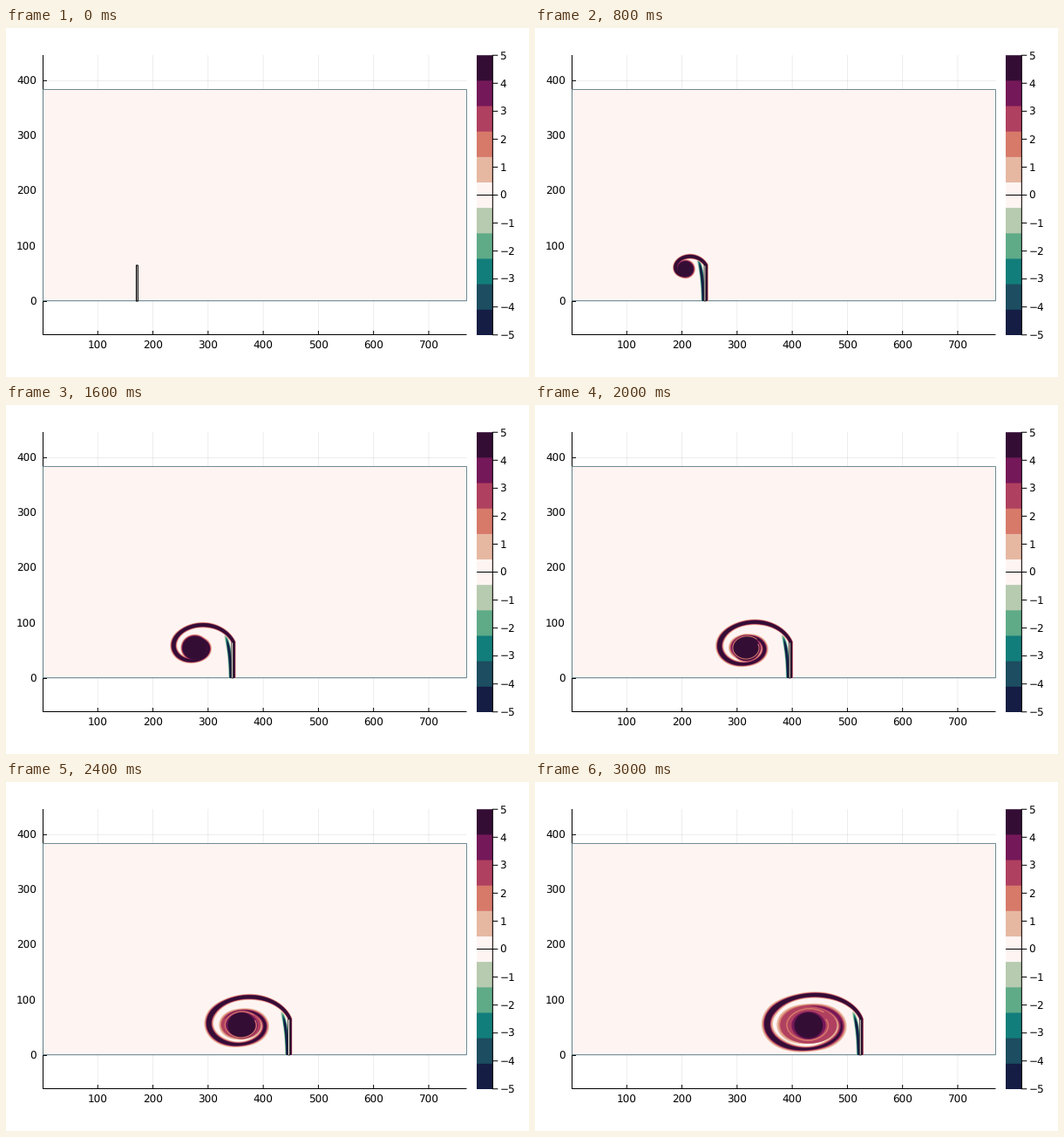
Animation, 600 px wide and 400 px high, one loop 3050 ms. Source, as a matplotlib script:

```python
import numpy as np
import matplotlib.pyplot as plt
from matplotlib.animation import FuncAnimation

FRAMES, STEP = 61, 50
SCALE = 0.6328            # pixels per data unit
WARM = ["#e6b8a2", "#d77a6a", "#b04060", "#751859", "#340d35"]
COOL = ["#b7cbb0", "#5fab88", "#127e7b", "#1c4d60", "#151d44"]
PALE = "#fef5f3"
LEVELS = (np.arange(5) + 0.5) * 10 / 11
TIP_Y, FLOOR = 272, 313

plt.rcParams["text.hinting"] = "no_hinting"
fig = plt.figure(figsize=(6, 4), dpi=100, facecolor="white")
ax = fig.add_axes([0, 0, 1, 1])
ax.set_xlim(0, 600)
ax.set_ylim(400, 0)
ax.axis("off")


def line(xs, ys, color="black", width=1.0, z=2, **kw):
    return ax.plot(xs, ys, color=color, lw=width * 0.72, zorder=z,
                   solid_capstyle="butt", snap=False, **kw)[0]


def label(x, y, value, ha):
    ax.text(x, y, str(value).replace("-", "\u2212"), ha=ha, va="baseline",
            family="DejaVu Sans", size=8.64)


def box(x0, y0, x1, y1, **kw):
    return ax.fill([x0, x1, x1, x0], [y0, y0, y1, y1], snap=False, **kw)[0]


def draw_chart():
    for v in range(100, 800, 100):
        x = 42 + SCALE * v
        line([x, x], [31, 352], width=0.7, z=1, alpha=0.1)
        line([x, x], [347, 352])
        label(x, 367.4, v, "center")
    for v in range(0, 500, 100):
        y = 313.5 - SCALE * v
        line([42, 528.5], [y, y], width=0.7, z=1, alpha=0.1)
        line([42, 47], [y, y])
        label(35, y + 4.3, v, "right")
    line([42.5, 42.5], [31, 352])
    line([42, 528.5], [351.5, 351.5])
    box(42.5, 70.5, 528.5, 312.6, fc=PALE, ec="#62808a", lw=0.65, zorder=3)

    h = 320.8 / 11
    for i, c in enumerate(WARM[::-1] + [PALE] + COOL):
        box(540, 31.2 + i * h, 558.3, 352, fc=c, lw=0, zorder=2)
    line([558.3, 558.3], [31, 352], z=4)
    for v in range(-5, 6):
        y = 191.5 - 32.05 * v
        line([540 if v == 0 else 558, 564.3], [y, y], z=4)
        label(566.3, y + 4.3, v, "left")


def layers(colors, z):
    return [ax.fill([0, 0, 0], [0, 0, 0], fc=c, lw=0, zorder=z + i * 0.1)[0]
            for i, c in enumerate(colors)]


draw_chart()
back = layers(COOL, 5)
arm = layers(WARM, 6)
core = layers(WARM, 6.05)
streak = line([], [], WARM[1], 1, 7)
plate = box(0, 0, 1, 1, fc=PALE, ec="black", zorder=8, joinstyle="round")
flow = back + arm + core + [streak]


def travel(t):
    """Plate path: constant acceleration, then constant speed."""
    s = t / 500
    return s * s / 2 if s < 1 else s - 0.5


def grow(s, limit, rate):
    return limit * (1 - np.exp(-s / rate))


def band(x, y, peak, sigma, level):
    """Outline of a Gaussian ribbon cut at one level."""
    half = sigma * np.sqrt(2 * np.log(np.maximum(peak / level, 1)))
    dx, dy = np.gradient(x), np.gradient(y)
    n = np.hypot(dx, dy) + 1e-9
    ox, oy = -dy / n * half, dx / n * half
    return np.column_stack([np.r_[x + ox, (x - ox)[::-1]],
                            np.r_[y + oy, (y - oy)[::-1]]])


def polar(cx, cy, r, deg):
    a = np.radians(deg)
    return cx + r * np.cos(a), cy - r * np.sin(a)


def ellipse(deg, aspect):
    """Polar radius of an ellipse of unit width and the given height."""
    a = np.radians(deg)
    return aspect / np.hypot(aspect * np.cos(a), np.sin(a))


def draw(frame):
    t = frame * STEP
    q = t / 3000
    s = travel(t)
    px = 150.4 + 64 * SCALE * s
    w = 0.9
    plate.set_xy([(px - w, FLOOR), (px - w, TIP_Y), (px + w, TIP_Y),
                  (px + w, FLOOR)])
    plate.set_linewidth(0.5 if frame else 0.8)
    for a in flow:
        a.set_visible(frame > 0)
    if frame == 0:
        return flow + [plate]

    ox, oy = grow(s, 69, 2.6), grow(s, 7, 1.2)
    rad = grow(s, 15, 1.2)
    thin = 0.4 + 0.6 * min(1, ox / 23)
    tip_x = px + 1.4
    cx, cy = tip_x - ox, TIP_Y + oy

    # Counter-rotating layer behind the plate
    u = np.linspace(0, 1, 50)
    top = TIP_Y - 9 * min(1, ox / 23)
    by = top + (FLOOR - top) * u
    bx = px - (1.3 + 4.4 * np.exp((TIP_Y - by) / 18)) * thin
    for p, lv in zip(back, LEVELS):
        p.set_xy(band(bx, by, 8 * np.minimum(1, 0.04 + 3 * u), 1.05 * thin, lv))

    # Elliptic spiral from the tip, winding in towards a limiting radius
    start = np.degrees(np.arctan2(oy, ox))
    aspect = 0.92 - 0.28 * q
    inner, decay = 20 * q, 0.26 + 0.39 * q * q
    outer = np.hypot(ox, oy) / ellipse(start, aspect)

    def width(deg):
        return inner + (outer - inner) * decay ** ((deg - start) / 180)

    def spiral(deg):
        return width(deg) * ellipse(deg, aspect)

    # Front layer, running up the plate and into the spiral
    deg = np.linspace(start, 720, 420)
    sx, sy = polar(cx, cy, spiral(deg), deg)
    wy = np.linspace(FLOOR, TIP_Y + 1, 25)
    x, y = np.r_[np.full(25, tip_x), sx], np.r_[wy, sy]
    ang = np.r_[np.zeros(25), deg]
    peak = 14 * np.exp(-1.2 * q ** 0.7 * ang / 360)
    swell = np.clip((ang - 95) / 60, 0, 1) * np.cos(np.radians(ang)) ** 2
    lift = np.clip(ang / 60, 0, 1)
    sigma = (0.95 + (0.15 + 0.35 * q) * lift + 1.3 * q * q * swell) * thin
    for p, lv in zip(arm, LEVELS):
        p.set_xy(band(x, y, peak, sigma, lv))

    # Rolled-up core: a dark oval inside the innermost turn
    turn = np.linspace(0, 360, 180)
    pool = width(510) * ellipse(turn, aspect)
    oval = rad * (1 + 0.1 * q * np.cos(np.radians(turn)) ** 2)
    reach = [1, 1, 1, np.clip(1.6 - 1.4 * q, 0, 1), 0]
    for i, p in enumerate(core):
        edge = oval + 0.52 * (4 - i) * thin
        r = np.maximum(edge, oval + (pool - oval) * reach[i])
        p.set_xy(np.column_stack(polar(cx, cy, r, turn)))

    deg = np.linspace(400, 740, 120)
    r = rad + (spiral(deg) - rad) * 0.6
    streak.set_data(*polar(cx, cy, r, deg))
    streak.set_linewidth(1.1 * q)
    streak.set_visible(q > 0.6)
    return flow + [plate]


anim = FuncAnimation(fig, draw, frames=FRAMES, init_func=lambda: draw(0),
                     interval=STEP, repeat=True, repeat_delay=0, blit=False)
plt.show()
```
